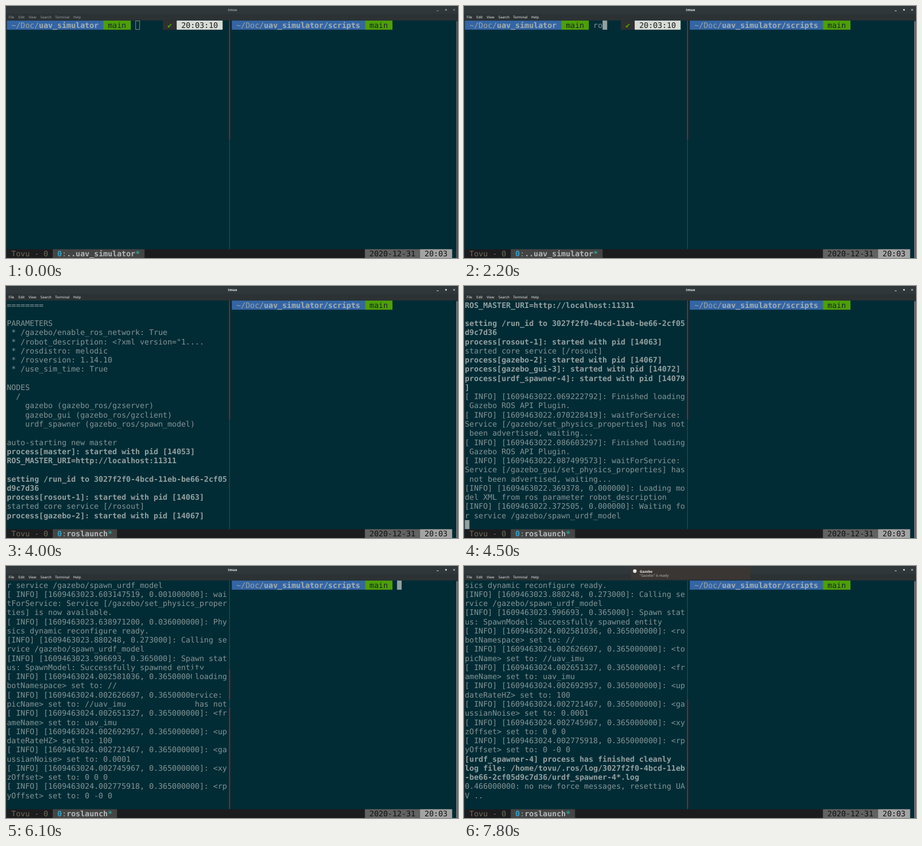
Write an HTML page that moves like this. It is 800 px wide and 448 px high and loops after 8000 ms.

```html
<!DOCTYPE html>
<html lang="en">
<head>
<meta charset="utf-8">
<title>tmux</title>
<style>
html, body { margin: 0; width: 100%; height: 100%; overflow: hidden; background: #022c35; }
svg { display: block; width: 100vw; height: 100vh; }
text { white-space: pre; text-rendering: geometricPrecision; }
.mono text { font: 13.495px "DejaVu Sans Mono", monospace; fill: #839496; }
.mono .bold, .mono .bold text { font-weight: bold; fill: #93a1a1; }
.ui text { font: 6.2px "Noto Sans", sans-serif; fill: #e9eded; }
.ui .strong { font-weight: bold; }
</style>
</head>
<body>
<svg viewBox="0 0 800 448" preserveAspectRatio="none">
  <defs>
    <clipPath id="splashArea"><rect x="329" y="184" width="124" height="68"/></clipPath>
  </defs>
  <rect width="800" height="448" fill="#022c35"/>
  <rect width="800" height="14" fill="#30373a"/>
  <rect y="14" width="800" height="11.7" fill="#2c3234"/>
  <rect y="25" width="1.2" height="423" fill="#2c3234"/>
  <rect x="796.4" y="25" width="3.6" height="423" fill="#2c3234"/>
  <g class="ui" id="chrome">
    <text class="strong" x="401" y="9" text-anchor="middle">tmux</text>
    <g id="menu"></g>
    <path d="M762.3 8.5h3.4M791.6 5.3l3 3m0-3l-3 3" stroke="#e9eded" stroke-width=".9"/>
    <rect x="777.5" y="5.5" width="2.6" height="2.6" fill="#e9eded"/>
    <rect x="797.2" y="27" width="2" height="421" rx="1" fill="#858b8d"/>
  </g>

  <g class="mono">
    <g id="leftPrompt"></g>
    <g id="clock"></g>
    <g id="rightPrompt"></g>
    <g id="output"></g>
    <rect x="395.1" y="25.9" width="1" height="406.5" fill="#414a4c"/>
    <rect id="divider" x="394.8" width="1.6" fill="#c0182c"/>
    <rect id="cursor" width="8.1" height="16.2" stroke="#93a1a1"/>

    <g id="splash" clip-path="url(#splashArea)">
      <rect x="329" y="184" width="124" height="68" fill="#022c35"/>
      <g id="splashOutput"></g>
      <rect x="395.1" y="184" width="1" height="68" fill="#414a4c"/>
      <rect x="394.8" y="184" width="1.6" height="53.3" fill="#c0182c"/>
    </g>

    <g id="status"></g>
  </g>

  <g class="ui" id="notice">
    <rect x="295" y="1.5" width="212" height="22.5" rx="1.5" fill="#3a3634"/>
    <circle cx="302.3" cy="9" r="3.2" fill="#e4e4e4"/>
    <text class="strong" x="311" y="11.6">Gazebo</text>
    <text x="311" y="19" style="fill:#bdbab8">"Gazebo" is ready</text>
  </g>
</svg>
<script>
const LOOP = 8000, COLS = 48, ROWS = 24;
const CELL_W = 8.125, CELL_H = 16.26, LEFT = 1.5, TOP = 25.9, BASE = 12.7;
const ENTER = 3100, SWITCH_PANE = 5500;
const INDENT = 28;
const COMMAND = 'roslaunch uav_gazebo simple_world.launch';
const typing = [[0, 0], [2100, 1], [2200, 2], [2300, 3], [2400, 4], [2500, COMMAND.length]];

// Each entry: time, then lines; a leading "!" marks bold.
const info = (stamp, text) => `[ INFO] [16094630${stamp}]: ${text}`;
const param = (stamp, text) => info(`24.002${stamp}, 0.365000000`, text);
const log = [
  [3400,
    '... logging to /home/tovu/.ros/log/3027f2f0-4bcd-11eb-be66-2cf05d9c7d36/roslaunch-Tovu-Desktop-14039.log',
    'Checking log directory for disk usage. This may take a while.',
    'Press Ctrl-C to interrupt'],
  [3500,
    'Done checking log file disk usage. Usage is <1GB.', '',
    'xacro: in-order processing became default in ROS Melodic. You can drop the option.'],
  [3700,
    '!started roslaunch server http://Tovu-Desktop:39183/', '',
    'SUMMARY', '========', '', 'PARAMETERS',
    ' * /gazebo/enable_ros_network: True',
    ' * /robot_description: <?xml version="1....',
    ' * /rosdistro: melodic', ' * /rosversion: 1.14.10', ' * /use_sim_time: True', '',
    'NODES', '  /',
    '    gazebo (gazebo_ros/gzserver)',
    '    gazebo_gui (gazebo_ros/gzclient)',
    '    urdf_spawner (gazebo_ros/spawn_model)', ''],
  [3800,
    'auto-starting new master',
    '!process[master]: started with pid [14053]',
    '!ROS_MASTER_URI=http://localhost:11311', ''],
  [3900, '!setting /run_id to 3027f2f0-4bcd-11eb-be66-2cf05d9c7d36'],
  [4000,
    '!process[rosout-1]: started with pid [14063]',
    'started core service [/rosout]',
    '!process[gazebo-2]: started with pid [14067]'],
  [4100,
    '!process[gazebo_gui-3]: started with pid [14072]',
    '!process[urdf_spawner-4]: started with pid [14079]'],
  [4200,
    info('22.069222792', 'Finished loading Gazebo ROS API Plugin.'),
    info('22.070228419', 'waitForService: Service [/gazebo/set_physics_properties] has not been advertised, waiting...'),
    info('22.086603297', 'Finished loading Gazebo ROS API Plugin.'),
    info('22.087499573', 'waitForService: Service [/gazebo_gui/set_physics_properties] has not been advertised, waiting...')],
  [4500,
    '[INFO] [1609463022.369378, 0.000000]: Loading model XML from ros parameter robot_description',
    '[INFO] [1609463022.372505, 0.000000]: Waiting for service /gazebo/spawn_urdf_model'],
  [5700, info('23.603147519, 0.001000000', 'waitForService: Service [/gazebo/set_physics_properties] is now available.')],
  [5800, info('23.638971200, 0.036000000', 'Physics dynamic reconfigure ready.')],
  [6000, '[INFO] [1609463023.880248, 0.273000]: Calling service /gazebo/spawn_urdf_model'],
  [6100,
    '[INFO] [1609463023.996693, 0.365000]: Spawn status: SpawnModel: Successfully spawned entity',
    param('581036', '<robotNamespace> set to: //'),
    param('626697', '<topicName> set to: //uav_imu'),
    param('651327', '<frameName> set to: uav_imu'),
    param('692957', '<updateRateHZ> set to: 100'),
    param('721467', '<gaussianNoise> set to: 0.0001'),
    param('745967', '<xyzOffset> set to: 0 0 0'),
    param('775918', '<rpyOffset> set to: 0 -0 0')],
  [7800,
    '![urdf_spawner-4] process has finished cleanly',
    '!log file: /home/tovu/.ros/log/3027f2f0-4bcd-11eb-be66-2cf05d9c7d36/urdf_spawner-4*.log',
    '0.466000000: no new force messages, resetting UAV ..']
];

const $ = id => document.getElementById(id);
const colX = col => LEFT + col * CELL_W;
const rowY = row => TOP + row * CELL_H;
const between = (t, a, b) => t >= a && t < b;

function add(parent, tag, attrs, text = '') {
  const node = document.createElementNS('http://www.w3.org/2000/svg', tag);
  for (const key in attrs) node.setAttribute(key, attrs[key]);
  node.textContent = text;
  return parent.appendChild(node);
}

// A coloured run of cells; spans are [text, colour, bold].
function block(parent, col, row, cols, fill, spans) {
  const rect = add(parent, 'rect', { x: colX(col), y: rowY(row), width: cols * CELL_W, height: CELL_H, fill });
  const text = add(parent, 'text', { x: colX(col), y: rowY(row) + BASE });
  const parts = spans.map(([s, colour, bold]) =>
    add(text, 'tspan', { style: `fill:${colour};font-weight:${bold ? 'bold' : 'normal'}` }, s));
  return { rect, parts };
}

function prompt(parent, col, tail) {
  const cols = tail.length + 8;
  block(parent, col, 0, cols, '#3465a4', [[' ~/Doc/', '#98a5a8'], [tail + ' ', '#a3b0b2', true]]);
  block(parent, col + cols, 0, 6, '#4e9f08', [[' main ', '#12272a']]);
}

const wrap = text => text.match(new RegExp(`.{1,${COLS}}`, 'g')) || [''];

function terminalRows(t) {
  const typed = typing.filter(([at]) => t >= at).pop()[1];
  const rows = wrap(' '.repeat(INDENT) + COMMAND.slice(0, typed)).map(text => ({ text }));
  for (const [at, ...lines] of log) {
    if (t < at) break;
    for (const line of lines) {
      const bold = line[0] === '!';
      for (const text of wrap(bold ? line.slice(1) : line)) rows.push({ text, bold });
    }
  }
  return { rows, typed };
}

function makeRows(parent) {
  return Array.from({ length: ROWS }, (_, i) => add(parent, 'text', { x: LEFT, y: rowY(i) + BASE }));
}

function fillRows(nodes, rows) {
  const shown = rows.slice(-ROWS);
  nodes.forEach((node, i) => {
    const { text = '', bold } = shown[i] || {};
    if (node.textContent !== text) node.textContent = text;
    node.setAttribute('class', bold ? 'bold' : '');
  });
}

[['File', 4.7], ['Edit', 22], ['View', 40], ['Search', 61], ['Terminal', 87], ['Help', 119]]
  .forEach(([label, x]) => add($('menu'), 'text', { x, y: 22.2 }, label));
prompt($('leftPrompt'), 0, 'uav_simulator');
prompt($('rightPrompt'), 49, 'uav_simulator/scripts');
block($('clock'), 34, 0, 3, '#303030', [[' ✔ ', '#4eaa08']]);
block($('clock'), 37, 0, 10, '#d8dcd6', [[' 20:03:10 ', '#151a1a']]);

block($('status'), 0, 25, 97, '#1c1c1e', [[' Tovu - 0 ', '#706a5c']]);
const tab = block($('status'), 10, 25, 20, '#444444',
  [[' 0', '#35a0c4', true], [':', '#8a9a9c'], ['', '#b2b8b8', true], ['*', '#2aa198', true]]);
block($('status'), 78, 25, 12, '#626262', [[' 2020-12-31 ', '#101010']]);
block($('status'), 90, 25, 7, '#a4a4a4', [[' 20:03 ', '#101010']]);

const output = makeRows($('output'));
fillRows(makeRows($('splashOutput')), terminalRows(4500).rows);

function show(id, on) { $(id).style.display = on ? '' : 'none'; }

function drawCursor(t, rows, typed) {
  const right = t >= SWITCH_PANE;
  const end = INDENT + typed;
  const entered = t >= ENTER;
  const col = right ? 85 : entered ? 0 : end % COLS;
  const row = right ? 0 : entered ? Math.min(rows.length, ROWS) : Math.floor(end / COLS);
  const hollow = t < 1000;
  const inset = hollow ? 0.5 : 0;
  const cursor = $('cursor');
  cursor.setAttribute('x', colX(col) + inset);
  cursor.setAttribute('y', rowY(row) + inset);
  cursor.setAttribute('width', CELL_W - 2 * inset);
  cursor.setAttribute('height', CELL_H - 2 * inset);
  cursor.setAttribute('fill', hollow ? 'none' : '#93a1a1');
  cursor.setAttribute('stroke-width', hollow ? 0.8 : 0);
  const lit = [[0, 1600], [1900, 3900], [4500, 5100], [SWITCH_PANE, 6200], [6800, 7400]];
  show('cursor', lit.some(([a, b]) => between(t, a, b)));
}

function draw(now) {
  const t = now % LOOP;
  const { rows, typed } = terminalRows(t);
  fillRows(output, rows);
  show('leftPrompt', rows.length <= ROWS);
  show('clock', typed < COMMAND.length);
  drawCursor(t, rows, typed);

  const rightActive = t >= SWITCH_PANE;
  $('divider').setAttribute('y', rowY(rightActive ? 13 : 0));
  $('divider').setAttribute('height', CELL_H * (rightActive ? 12 : 13));

  const name = t < 3300 ? '..uav_simulator' : 'roslaunch';
  tab.parts[2].textContent = name;
  tab.rect.setAttribute('width', (name.length + 5) * CELL_W);

  $('chrome').style.opacity = 0.58 + 0.42 * Math.min(1, Math.max(0, (t - 1000) / 200));
  show('splash', between(t, 5000, 7500));
  show('notice', t >= 7800);
  requestAnimationFrame(draw);
}
draw(0);
</script>
</body>
</html>
```
